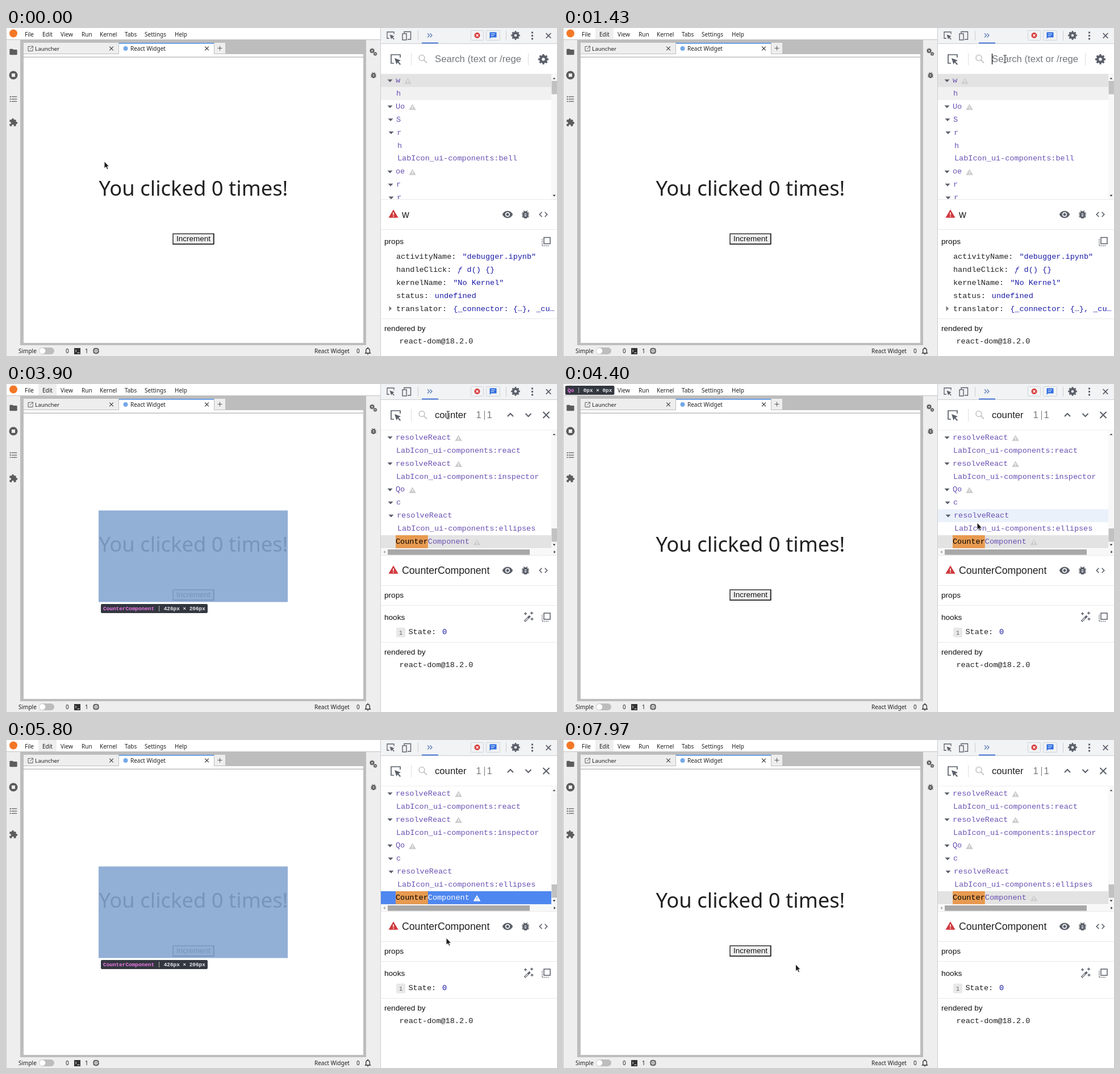
Recreate the animation shown at these times as an HTML page. Size 970 by 577 pixels, loop 8000 ms.

```html
<!DOCTYPE html>
<html lang="en">
<head>
<meta charset="utf-8">
<title>Inspecting a widget</title>
<style>
html, body { margin: 0; width: 100%; height: 100%; overflow: hidden; background: #fff; }
svg { display: block; width: 100%; height: 100%; }
text { white-space: pre; fill: #202020; }
.ui { font: 10px "Noto Sans", sans-serif; }
.big { font: 36.4px "Noto Sans", sans-serif; fill: #212121; }
.sans { font: 13.6px "Liberation Sans", Arial, sans-serif; fill: #111; }
.find { font: 16.7px "Liberation Sans", Arial, sans-serif; }
.title { font: 17.7px "Liberation Sans", Arial, sans-serif; }
.mono { font: 13.52px "Liberation Mono", monospace; }
.small { font: 10px "Liberation Mono", monospace; fill: #5f6368; }
.tip { font: bold 9.4px "Liberation Mono", monospace; }
.comp { fill: #6a51b2; }
.val { fill: #1a1aa6; }
.grey { fill: #75787c; }
</style>
</head>
<body>
<svg viewBox="0 0 970 577" preserveAspectRatio="none">
  <defs><clipPath id="treeClip"><rect x="660" y="81" width="310" height="220"/></clipPath></defs>
  <g id="page"></g>
  <g id="live"></g>
</svg>
<script>
const LOOP = 8000, CHAR = 8.11, ROW = 22.9;
const INK = '#5a5f69', SIDE = '#5c5c5c';

const rect = (x, y, w, h, fill, more = '') =>
  `<rect x="${x}" y="${y}" width="${w}" height="${h}" fill="${fill}" ${more}/>`;
const text = (x, y, s, cls, more = '') => `<text x="${x}" y="${y}" class="${cls}" ${more}>${s}</text>`;
const line = (d, color, w = 1, more = '') =>
  `<path d="${d}" fill="none" stroke="${color}" stroke-width="${w}" ${more}/>`;
const fill = (d, color) => `<path d="${d}" fill="${color}"/>`;
const dot = (x, y, r, color) => `<circle cx="${x}" cy="${y}" r="${r}" fill="${color}"/>`;
const icon = (x, y, size, d, color) =>
  `<path transform="translate(${x - size / 2} ${y - size / 2}) scale(${size / 24})" d="${d}" fill="${color}" fill-rule="evenodd"/>`;
const cross = (x, y, r, color, w) =>
  line(`M${x - r} ${y - r}l${2 * r} ${2 * r}m0 ${-2 * r}l${-2 * r} ${2 * r}`, color, w);
const ring = (x, y, r, color, w, more = '') =>
  `<circle cx="${x}" cy="${y}" r="${r}" fill="none" stroke="${color}" stroke-width="${w}" ${more}/>`;
const gear = (x, y, r, color) =>
  ring(x, y, r * .55, color, r * .5) +
  ring(x, y, r * .85, color, r * .32, 'pathLength="16" stroke-dasharray="1" stroke-dashoffset=".5"');
const warn = (x, y, s, color, mark) =>
  fill(`M${x} ${y - s * .5}l${s * .55} ${s * .94}h${-s * 1.1}z`, color) +
  line(`M${x} ${y - s * .16}v${s * .28}m0 ${s * .08}v${s * .1}`, mark, s * .11);
const down = (x, y) => fill(`M${x - 4.5} ${y - 2}h9l-4.5 4.8z`, INK);
const inspect = (x, y, k) => `<g transform="translate(${x} ${y}) scale(${k})">` +
  line('M8 -3V-8H-8V7H-3', INK, 1.7) + fill('M-2 -2L9 2 5 4 9 8.5 7.5 10 3.5 5.5 1.5 9z', INK) + '</g>';
const copyIcon = (x, y) =>
  line(`M${x - 4} ${y - 7}h11v11h-11z`, INK, 1.5) +
  line(`M${x - 7} ${y - 4}v11.500h12`, INK, 1.5, 'stroke-dasharray="1.5 1.5"');

const BUG = 'M20 8h-2.81a6 6 0 0 0-1.82-1.96L17 4.41 15.59 3l-2.17 2.17a6 6 0 0 0-2.83 0L8.41 3 7 4.41l1.62 1.63C7.88 6.55 7.26 7.22 6.81 8H4v2h2.09L6 11v1H4v2h2v1l.09 1H4v2h2.81a6 6 0 0 0 10.38 0H20v-2h-2.09l.09-1v-1h2v-2h-2v-1l-.09-1H20zm-6 8h-4v-2h4zm0-4h-4v-2h4z';
const EYE = 'M12 4.5C7 4.5 2.73 7.61 1 12c1.73 4.39 6 7.5 11 7.5s9.27-3.11 11-7.5c-1.73-4.39-6-7.5-11-7.5zM12 17a5 5 0 1 1 0-10 5 5 0 0 1 0 10zm0-8a3 3 0 1 0 0 6 3 3 0 0 0 0-6z';
const FOLDER = 'M10 4H4a2 2 0 0 0-2 2v12a2 2 0 0 0 2 2h16a2 2 0 0 0 2-2V8a2 2 0 0 0-2-2h-8z';
const CODE = 'M9.4 16.6 4.8 12l4.6-4.6L8 6l-6 6 6 6zm5.2 0 4.6-4.6-4.6-4.6L16 6l6 6-6 6z';
const PUZZLE = 'M20.5 11H19V7a2 2 0 0 0-2-2h-4V3.5a2.5 2.5 0 0 0-5 0V5H4a2 2 0 0 0-2 2v3.8h1.5a2.7 2.7 0 0 1 0 5.4H2V20a2 2 0 0 0 2 2h3.8v-1.5a2.7 2.7 0 0 1 5.4 0V22H17a2 2 0 0 0 2-2v-4h1.5a2.5 2.5 0 0 0 0-5z';
const BELL = 'M12 22a2 2 0 0 0 2-2h-4a2 2 0 0 0 2 2zm6-6v-5c0-3.07-1.63-5.64-4.5-6.32V4a1.5 1.5 0 0 0-3 0v.68C7.64 5.36 6 7.92 6 11v5l-2 2v1h16v-1zm-2 1H8v-6c0-2.48 1.51-4.5 4-4.5s4 2.02 4 4.5z';
const LIST = 'M2 4h3v3H2zm0 6.500h3v3H2zm0 6.500h3v3H2zM7 4.500h15v2H7zm0 6.500h15v2H7zm0 6.500h15v2H7z';

function notebook() {
  const menu = [[33, 'File'], [64, 'Edit'], [96, 'View'], [133, 'Run'], [165, 'Kernel'], [209, 'Tabs'], [244, 'Settings'], [297, 'Help']];
  return rect(0, 21, 660, 556, '#eee') + rect(25, 21, 609, 537, '#bdbdbd') +
    line('M0 20.500H660', '#c4c4c4') + line('M.5 0V577', '#c8c8c8') +
    dot(13, 9.5, 7, '#f37726') +
    menu.map(([x, s]) => text(x, 14.5, s, 'ui')).join('') +
    rect(31, 26, 167, 19, '#eee') + rect(199, 26, 167, 20, '#fff') + rect(199, 26, 167, 1.6, '#4d8fe0') +
    rect(367, 26, 19, 19, '#eee') + rect(31, 46, 598, 4.5, '#fff') + rect(31, 52, 598, 502, '#fff') +
    line('M43 32.500H39V40.500H47V36.500M44 32H47.500V35.500M47 32.500L42 37.500', SIDE) +
    text(51, 39.5, 'Launcher', 'ui', 'style="font-size:9.8px"') + cross(185.5, 36, 3.3, '#444', 1.2) +
    dot(210.5, 36, 4, '#75a9e8') + text(219, 39.5, 'React Widget', 'ui') + cross(353.5, 36, 3.3, '#333', 1.2) +
    line('M372.500 35.500h8m-4 -4v8', '#555') +
    icon(13, 42, 16, FOLDER, SIDE) + dot(13, 83, 7.5, SIDE) + rect(10, 80, 6, 6, '#eee') +
    icon(13, 125, 15, LIST, SIDE) + icon(13, 166, 16, PUZZLE, SIDE) +
    gear(644.5, 40, 4.5, SIDE) + gear(650, 45.5, 3.4, SIDE) + icon(647, 83, 14, BUG, SIDE) +
    text(330, 295, 'You clicked 0 times!', 'big', 'text-anchor="middle"') +
    rect(294, 362, 71.5, 18, '#efefef', 'stroke="#333" stroke-width="1.5"') +
    line('M293.500 380.500H366V361.500', '#111') +
    text(330, 375.3, 'Increment', 'sans', 'text-anchor="middle" style="font-size:13.5px"') +
    text(22, 571.5, 'Simple', 'ui') + rect(58, 562, 27, 12, '#bdbdbd', 'rx="6"') + dot(64, 568, 5.3, '#fff') +
    text(105, 571.5, '0', 'ui') + rect(120, 563, 11, 11, '#333') + line('M122 566l2 2-2 2m3.500 1.500h4', '#eee') +
    text(139, 571.5, '1', 'ui') +
    rect(155, 564.5, 7, 7, 'none', 'stroke="#444" stroke-width="1.4"') + rect(157.5, 567, 2, 2, '#444') +
    ring(158.5, 568, 5, '#444', 1.4, 'pathLength="24" stroke-dasharray="1"') +
    text(543, 571.5, 'React Widget', 'ui') + text(617, 571.5, '0', 'ui') + icon(637, 568, 16, BELL, '#333');
}

function devtools() {
  return rect(660, 0, 310, 577, '#fff') + rect(660, 0, 310, 27, '#f1f3f4') + line('M659.500 0V577M660 27.500H970', '#cbcdd1') +
    inspect(677, 13, .75) +
    line('M701 9V6.500H712.500V20H707', INK, 1.4) + rect(698, 10, 7, 11, 'none', `stroke="${INK}" stroke-width="1.4"`) +
    line('M725.500 5V22M880.500 5V22', '#cbcdd1') +
    line('M742 9.500l3.500 3.500-3.500 3.500m4.500-7l3.500 3.500-3.500 3.500', '#5878b8', 1.3) + rect(732, 25.5, 29, 1.8, '#3b6fd6') +
    rect(818.5, 4.5, 22, 17, '#f1f3f4', 'stroke="#d0d3d7" rx="1"') + dot(829.5, 13, 5, '#d93b3b') + cross(829.5, 13, 2, '#fff', 1.2) +
    rect(845.5, 4.5, 24, 17, '#f1f3f4', 'stroke="#d0d3d7" rx="1"') +
    fill('M851.500 7.500h12v9h-9.500l-2.500 2.500z', '#2f6de0') + line('M854 10.500h7m-7 3h5', '#fff') +
    gear(897, 13, 7.8, INK) + dot(926.5, 8, 1.7, INK) + dot(926.5, 13.5, 1.7, INK) + dot(926.5, 19, 1.7, INK) +
    cross(955, 13.5, 4.3, INK, 1.7) +
    inspect(686, 55, 1) + line('M713.500 44V66', '#ddd') +
    ring(732, 52.5, 5, '#c4c4c4', 1.6) + line('M735.500 56l5.500 5.500', '#c4c4c4', 1.8) + line('M660 81H970', '#eee');
}

// Tree rows: [name, indent, arrow, warning]
const START_ROWS = [['w', 0, 1, 1], ['h', 1], ['Uo', 0, 1, 1], ['S', 1, 1], ['r', 2, 1], ['h', 3],
  ['LabIcon_ui-components:bell', 3], ['oe', 0, 1, 1], ['r', 1, 1], ['r', 2, 1]];
const FOUND_ROWS = [['resolveReact', 0, 1, 1], ['LabIcon_ui-components:react', 1], ['resolveReact', 0, 1, 1],
  ['LabIcon_ui-components:inspector', 1], ['Qo', 0, 1, 1], ['c', 1, 1], ['resolveReact', 2, 1],
  ['LabIcon_ui-components:ellipses', 3], ['CounterComponent', 0, 0, 1]];

function tree(s) {
  const found = s.query > 0, rows = found ? FOUND_ROWS : START_ROWS;
  const top = found ? 82.8 : 81;
  const selected = !found ? 0 : s.query === 1 ? 5 : 8;
  const band = (i, color) => rect(660, top + i * ROW, 300, ROW, color);
  let out = found ? '' : band(1, '#f1f1f1');
  if (s.hover >= 0) out += band(s.hover, '#ebf1fb');
  out += band(selected, s.focused ? '#4f87f0' : '#e3e3e3');
  rows.forEach(([name, indent, arrow, warning], i) => {
    const x = 686 + indent, y = top + (i + .5) * ROW, active = found && i === selected;
    const hot = active && s.focused;
    if (arrow) out += down(x - 10, y);
    if (active) out += rect(x, y - ROW / 2, s.query * CHAR, ROW, '#e79a50');
    const label = active ? `<tspan fill="#000">${name.slice(0, s.query)}</tspan>${name.slice(s.query)}` : name;
    out += text(x, y + 3.6, label, 'mono comp', hot ? 'style="fill:#fff"' : '');
    if (warning) out += warn(x + name.length * CHAR + 13.3, y + 1, 11.5, hot ? '#fff' : '#cdcdcd', hot ? '#4f87f0' : '#fff');
  });
  const endY = found ? 283 : 295;
  out += rect(960, 82, 10, 219, '#f8f8f8') + rect(960.5, found ? 254 : 93, 9.5, 23.5, '#c1c1c1') +
    fill('M962.500 90h5l-2.500-3z', '#555') + fill(`M962.500 ${endY - 1.5}h5l-2.500 3z`, '#333');
  if (found) out += rect(660, 290, 310, 11, '#f8f8f8') + rect(672, 291, 250, 9.5, '#a8a8a8') +
    fill('M667.500 293v5l-3-2.500z', '#999') + fill('M964.500 293v5l3-2.500z', '#333');
  return `<g clip-path="url(#treeClip)">${out}</g>`;
}

const ADVANCE = { c: .5, o: .556, u: .556, n: .556, t: .278, e: .556, r: .333 };
function search(s) {
  const word = 'counter'.slice(0, s.query);
  const end = 755.5 + [...word].reduce((w, ch) => w + ADVANCE[ch] * 16.7, 0);
  const caret = s.caret ? line(`M${end} 45V64`, '#000', 1.2) : '';
  if (!word) return text(755, 60, 'Search (text or /rege', 'find grey') + line('M919.500 44V66', '#ddd') + gear(946, 55, 9, INK) + caret;
  return text(755, 60, word, 'find') + text(827.5, 60, '1', 'find grey') + line('M842.500 47V63', '#777') +
    text(846.5, 60, s.query === 1 ? '2' : '1', 'find grey') +
    line('M883 57l5-5 5 5M914.500 52l5 5 5-5', INK, 2) + cross(951, 54.5, 5.5, INK, 2) + caret;
}

function details(s) {
  const rules = ys => ys.map(y => line(`M660 ${y}.500H970`, '#e9e9e9')).join('');
  if (s.query === 1 || s.query === 2) return text(785, 444.5, 'Loading...', 'find grey');
  const head = name => warn(682, 327, 15.6, '#d0383d', '#fff') + text(697, 334, name, 'title') +
    icon(883, 328, 20, EYE, INK) + icon(914.5, 328, 19, BUG, INK) + icon(946, 328, 19, CODE, INK);
  const rendered = y => text(666, y, 'rendered by', 'sans') + text(692.5, y + 21.8, 'react-dom@18.2.0', 'mono');
  if (!s.query) {
    const props = [['activityName', '"debugger.ipynb"'], ['handleClick', '<tspan font-style="italic">ƒ</tspan> d() {}'],
      ['kernelName', '"No Kernel"'], ['status', 'undefined'], ['translator', '{_connector: {…}, _cu…']];
    return rules([301, 354, 511]) + head('w') + text(666, 380, 'props', 'sans') + copyIcon(951, 375.5) +
      props.map(([key, value], i) => {
        const y = 406 + i * ROW;
        return text(687, y, key + ':', 'mono') + text(698 + (key.length + 1) * CHAR, y, value, 'mono val');
      }).join('') +
      fill('M674.500 489v9l4.500-4.500z', '#777') + rendered(533);
  }
  return rules([301, 354, 389, 454]) + head('CounterComponent') + text(666, 376, 'props', 'sans') + text(666, 414.5, 'hooks', 'sans') +
    line('M913 417.500L922.500 408', INK, 3.6) + line('M914 416.500L919 411.500', '#fff', 1.2) +
    line('M914.500 401.500v5m-2.500-2.500h5M925.500 400.500v5m-2.500-2.500h5M926 411v5m-2.500-2.500h5', INK, 1.4) +
    copyIcon(951, 410) + rect(687, 428.5, 16, 17, '#e8e8e8', 'rx="2"') + text(692, 440.5, '1', 'small') +
    text(708.5, 440.3, 'State:', 'mono') + text(768, 440.3, '0', 'mono val') + rendered(476);
}

function tip(x, y, name, size) {
  const w = 5.64, sep = x + 4 + name.length * w + 8.4;
  return rect(x, y, sep - x + 12 + size.length * w, 16, '#333740', 'rx="2"') +
    text(x + 4, y + 10.8, name, 'tip', 'style="fill:#ee78e6"') + line(`M${sep} ${y + 3}v10`, '#b5b5b5') +
    text(sep + 8, y + 10.8, size, 'tip', 'style="fill:#e4e6e8"');
}

function pointer({ x, y }) {
  if (x > 750 && x < 915 && y > 30 && y < 80) {
    const d = `M${x - 2.5} ${y - 6}h2.500m.5 0h2.500M${x} ${y - 6}v13m-2.500 0h5`;
    return line(d, '#fff', 2.6) + line(d, '#222', 1.1);
  }
  return `<path transform="translate(${x} ${y})" d="M0 0V12.500L2.900 9.900 4.900 14.300 7 13.400 5.100 9.200H8.700Z" fill="#1c1c1c" stroke="#fff" stroke-width=".9"/>`;
}

// Each cue changes part of the state at its time.
const at = (time, x, y, more) => [time, { x, y, ...more }];
const cues = [at(0, 173, 234.5, { query: 0, hover: -1, tip: '', caret: false, edit: false, overlay: false, focused: false })];
for (let i = 0; i < 14; i++) {
  const p = (i + 1) / 14, u = p * p * (3 - 2 * p), v = 1 - u;
  cues.push(at(230 + i * 67, 173 * v * v + 1120 * u * v + 778 * u * u, 234.5 * v * v + 380 * u * v + 54 * u * u));
}
cues.push([830, { hover: 1, tip: 'h' }], [900, { hover: -1 }], [1030, { tip: '' }],
  [1330, { caret: true }], [1430, { edit: true }]);
[2370, 2500, 2670, 2830, 3000, 3130, 3300].forEach((time, i) => cues.push([time, { query: i + 1 }]));
cues.push([2370, { tip: 'c' }], [2670, { tip: '', overlay: true }], [3900, { caret: false }],
  at(4070, 768, 96, { hover: 0 }), at(4230, 745, 190, { hover: 4, tip: 'Qo', overlay: false }),
  at(4400, 729, 244, { hover: 6 }), at(4630, 738, 260, { hover: 7, tip: 'resolveReact' }),
  at(4770, 747, 270, { hover: -1, caret: true }), at(4930, 751, 274, { tip: '', overlay: true }),
  [5130, { caret: false, focused: true }], at(5470, 757, 286), at(5630, 767, 314), at(5800, 775, 348),
  at(5970, 777, 392, { overlay: false }), at(6170, 778, 424),
  at(6300, 780, 430), at(6500, 782, 434), at(6700, 783, 435), [6900, { focused: false }],
  at(7530, 755, 434), at(7670, 625, 425), at(7830, 475, 406), at(7970, 409.5, 394.5));
cues.sort((a, b) => a[0] - b[0]);

function scene(t) {
  const s = Object.assign({}, ...cues.filter(([time]) => time <= t).map(([, change]) => change));
  let out = '';
  if (s.tip) out += tip(4, 3, s.tip, '0px × 0px');
  else if (s.edit) out += rect(57, 0, 32, 20, '#eee') + text(64, 14.5, 'Edit', 'ui');
  if (s.overlay) out += rect(163, 222.5, 333, 161, 'rgb(131,164,209)', 'opacity=".88"') + tip(167, 387, 'CounterComponent', '426px × 206px');
  return out + tree(s) + search(s) + details(s) + pointer(s);
}

const live = document.getElementById('live');
document.getElementById('page').innerHTML = notebook() + devtools();
const start = performance.now();
let shown = '';
function play() {
  const next = scene((performance.now() - start) % LOOP);
  if (next !== shown) live.innerHTML = shown = next;
  requestAnimationFrame(play);
}
play();
</script>
</body>
</html>
```
